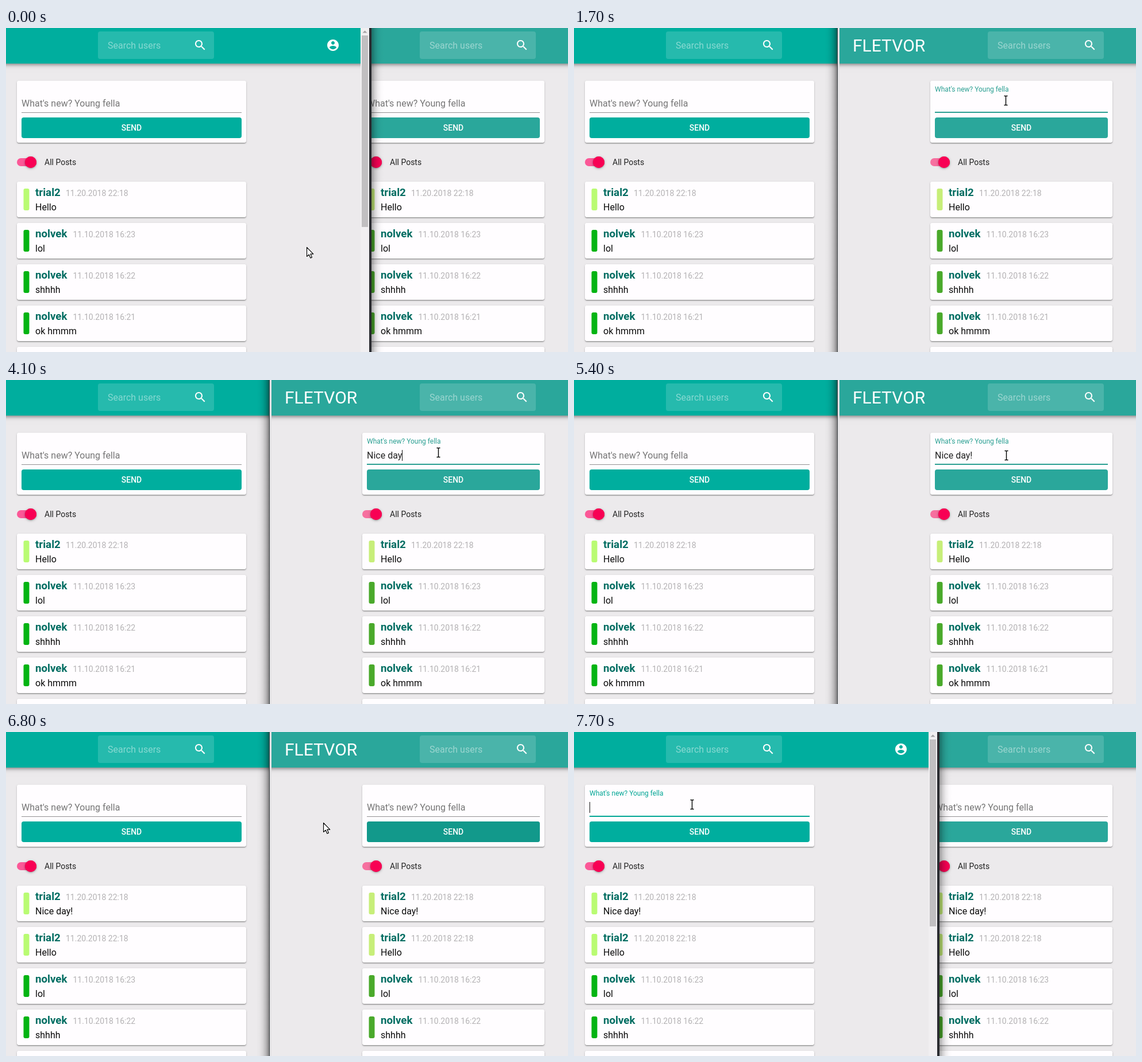
Recreate the animation shown at these times as an HTML page with a canvas. Size 978 by 565 pixels, loop 8 s.

```html
<!DOCTYPE html>
<html lang="en">
<head>
<meta charset="utf-8">
<title>Two windows, one feed</title>
<style>
  html, body { margin: 0; width: 100%; height: 100%; overflow: hidden; }
  canvas { display: block; }
</style>
</head>
<body>
<canvas id="stage" width="978" height="565"></canvas>
<script>
const ctx = document.getElementById('stage').getContext('2d');
const LOOP = 8000, STEP = 100, H = 565;

const SEARCH = new Path2D('M15.5 14h-.79l-.28-.27C15.41 12.59 16 11.11 16 9.5 16 5.91 13.09 3 9.5 3S3 5.91 3 9.5 5.91 16 9.5 16c1.61 0 3.09-.59 4.23-1.57l.27.28v.79l5 4.99L20.49 19l-4.99-5zm-6 0C7.01 14 5 11.99 5 9.5S7.01 5 9.5 5 14 7.01 14 9.5 11.99 14 9.5 14z');
const ACCOUNT = new Path2D('M12 2C6.48 2 2 6.48 2 12s4.48 10 10 10 10-4.48 10-10S17.52 2 12 2zm0 3c1.66 0 3 1.34 3 3s-1.34 3-3 3-3-1.34-3-3 1.34-3 3-3zm0 14.2c-2.5 0-4.71-1.28-6-3.22.03-1.99 4-3.08 6-3.08 1.99 0 5.97 1.09 6 3.08-1.29 1.94-3.5 3.22-6 3.22z');
const ARROW = new Path2D('M.5.5v16l3.7-3.4 2.6 6 2.7-1.2-2.6-5.8h5z');
const BEAM = new Path2D('M-3-8h2.2L0-7.4.8-8H3M-3 8h2.2L0 7.4.8 8H3M0-7.4V7.4');
const HAND = new Path2D('M-1.5 8V1Q0-1 1.5 1V6Q3 4.8 4.3 6.2 6 5.2 7 6.8 9.5 6 10 8.5V12L8.5 15.5H0L-4.5 9.5Q-4.5 7.2-2.5 8.2L-1.5 9.5z');

const POSTS = [
  ['trial2', '11.20.2018 22:18', 'Nice day!'],
  ['trial2', '11.20.2018 22:18', 'Hello'],
  ['nolvek', '11.10.2018 16:23', 'lol'],
  ['nolvek', '11.10.2018 16:22', 'shhhh'],
  ['nolvek', '11.10.2018 16:21', 'ok hmmm'],
  ['nolvek', '11.10.2018 16:21', 'hey'],
];
const POSTED = 5900;

// Typing: [time, text]; an empty caret interval means the caret is hidden.
const TYPED = [[0, ''], [2300, 'N'], [2600, 'Nic'], [2800, 'Nice'], [3000, 'Nice '],
  [3800, 'Nice d'], [3900, 'Nice da'], [4100, 'Nice day'], [4300, 'Nice day!'], [5800, '']];
const CARET_ON = [[1200, 1700], [2300, 3500], [3800, 4900]];

// Pointer path: [time, x, y], eased between the points.
const POINTER = [[400, 523, 382], [1000, 751, 127], [1800, 751, 127], [1900, 752, 127],
  [5300, 752, 127], [5400, 752, 132], [5500, 752, 132], [5700, 778, 178],
  [6500, 778, 178], [7200, 205, 127]];

const LEFT = {
  card: 19, width: 399, search: 160, teal: '#00ae9e', dark: '#00897b', accent: '#00a594',
  track: '#fb5897', lime: '#b9fb73', green: '#04b413',
};
const RIGHT = {
  card: 620, width: 317, search: 720, teal: '#2aa79b', dark: '#039080', accent: '#2a9f92',
  track: '#f6709f', lime: '#c7ee79', green: '#4aa92b',
};

const ramp = (t, from, span) => Math.min(1, Math.max(0, (t - from) / span));
const easeOut = p => 1 - (1 - p) ** 3;
const smooth = p => p * p * (3 - 2 * p);
const mix = (a, b, p) => a + (b - a) * p;
const pulse = (t, on, off, span) => easeOut(ramp(t, on, span)) - easeOut(ramp(t, off, span));
const within = (t, spans) => spans.some(([a, b]) => t >= a && t < b);

function rect(x, y, w, h, fill, radius = 0) {
  ctx.fillStyle = fill;
  ctx.beginPath();
  ctx.roundRect(x, y, w, h, radius);
  ctx.fill();
}

function raised(shadows, draw) {
  for (const [dy, blur, alpha] of shadows) {
    ctx.shadowColor = `rgba(0,0,0,${alpha})`;
    ctx.shadowOffsetY = dy;
    ctx.shadowBlur = blur;
    draw();
  }
  ctx.shadowColor = 'transparent';
}

function text(str, x, y, size, fill, weight = 400, align = 'left') {
  ctx.font = `${weight} ${size}px Roboto, sans-serif`;
  ctx.textAlign = align;
  ctx.fillStyle = fill;
  ctx.fillText(str, x, y);
}

function icon(path, x, y) {
  ctx.save();
  ctx.translate(x, y);
  ctx.fillStyle = '#fff';
  ctx.fill(path);
  ctx.restore();
}

const panel = (x, y, w, h) =>
  raised([[1, 3, .2], [1, 1, .14], [2, 1, .12]], () => rect(x, y, w, h, '#fffdff', 4));

function header(skin, x, w) {
  raised([[2, 4, .2], [4, 5, .14], [1, 10, .12]], () => rect(x - 20, -20, w + 40, 82, skin.teal));
  rect(skin.search, 6, 202, 48, 'rgba(255,255,255,.15)', 4);
  text('Search users', skin.search + 17, 36, 16, 'rgba(255,255,255,.45)');
  icon(SEARCH, skin.search + 166, 18);
}

function composer(skin, s) {
  const x = skin.card + 8, w = skin.width - 16;
  panel(skin.card, 92, skin.width, 108);

  if (!s.value) s.float = Math.min(s.float, 1);
  text("What's new? Young fella", x, mix(137, 111, s.float), mix(16, 12, s.float),
    s.focused ? skin.accent : '#757575');
  text(s.value, x, 137, 16, '#212121');
  if (s.caret) {
    ctx.font = '16px Roboto, sans-serif';
    rect(Math.round(x + ctx.measureText(s.value).width), 122, 1, 19, '#111');
  }

  rect(x, 147, w, 1, '#919092');
  if (s.hover) rect(x, 146, w, 2, `rgba(25,20,30,${s.hover})`);
  rect(x + w / 2 * (1 - s.line), 146, w * s.line, 2, skin.accent);

  rect(x, 156, w, 36, skin.teal, 4);
  ctx.save();
  ctx.globalAlpha = s.press;
  rect(x, 156, w, 36, skin.dark, 4);
  ctx.restore();
  if (s.ripple > 0) {
    ctx.save();
    ctx.clip();
    ctx.beginPath();
    ctx.arc(778, 179, s.ripple, 0, 7);
    ctx.fillStyle = `rgba(255,255,255,${s.glow})`;
    ctx.fill();
    ctx.restore();
  }
  text('SEND', x + w / 2, 179, 14, '#fff', 500, 'center');
}

function toggle(skin) {
  const x = skin.card;
  rect(x, 227, 34, 14, skin.track, 7);
  raised([[1, 4, .3], [1, 2, .15]], () => rect(x + 14, 224, 20, 20, '#f80054', 10));
  text('All Posts', x + 48, 239, 14, '#222');
}

function feed(skin, t) {
  const x = skin.card;
  POSTS.slice(t < POSTED ? 1 : 0).forEach(([user, date, message], i) => {
    const y = 268 + 72 * i, guest = user === 'trial2';
    panel(x, y, skin.width, 62);
    rect(x + 11.5, y + 12, 10, 38, guest ? skin.lime : skin.green, 3);
    text(user, x + 32, y + 25, 18.72, '#006d62', 700);
    text(date, x + (guest ? 85 : 97.5), y + 25, 14, '#b4b2b4');
    text(message, x + 32, y + 50, 16, '#0a0a0a');
  });
}

function page(skin, x, w, t, state) {
  ctx.save();
  ctx.beginPath();
  ctx.rect(x, 0, w, H);
  ctx.clip();
  rect(x, 0, w, H, '#eceaec');
  composer(skin, state);
  toggle(skin);
  feed(skin, t);
  header(skin, x, w);
  if (skin === LEFT) icon(ACCOUNT, 557, 18);
  else text('FLETVOR', 485, 41, 30, '#fff');
  ctx.restore();
}

function sideShadow(from, to, alpha) {
  const g = ctx.createLinearGradient(from, 0, to, 0);
  [1, .5, .2, .05, 0].forEach((a, i) => g.addColorStop(i / 4, `rgba(0,0,0,${a * alpha})`));
  rect(Math.min(from, to), 0, Math.abs(to - from), H, g);
}

function leftWindow(t) {
  sideShadow(636, 658, .35);
  page(LEFT, 0, 617, t, {
    value: '', focused: t >= 7450, caret: t >= 7500,
    float: easeOut(ramp(t, 7450, 200)), line: easeOut(ramp(t, 7450, 200)),
    hover: ramp(t, 6950, 200), press: 0, ripple: 0,
  });
  rect(617, 0, 15, H, '#f1eff1');
  rect(619, 13, 11, t < POSTED ? 334 : 326, '#c1bfc1');
  ctx.fillStyle = '#a3a1a3';
  ctx.beginPath();
  ctx.moveTo(620.5, 8.5);
  ctx.lineTo(624.5, 4.5);
  ctx.lineTo(628.5, 8.5);
  ctx.fill();
  rect(632, 0, 4, H, '#2a2b30');
}

function rightWindow(t) {
  sideShadow(458, 436, .45);
  rect(458, 0, 1, H, '#3c4144');
  rect(459, 0, 3, H, '#e4e3e5');
  page(RIGHT, 462, 516, t, {
    value: TYPED.findLast(([from]) => t >= from)[1],
    focused: t >= 1050 && t < 5700,
    caret: within(t, CARET_ON),
    float: pulse(t, 1050, 5800, 200),
    line: pulse(t, 1050, 5700, 200),
    hover: ramp(t, 750, 200) - ramp(t, 5450, 200),
    press: ramp(t, 5550, 250) - ramp(t, 6700, 250),
    ripple: 155 * easeOut(ramp(t, 5700, 550)),
    glow: .3 * (1 - ramp(t, 5750, 550)) ** 2,
  });
}

function pointerAt(t) {
  const i = POINTER.findIndex(([time]) => time > t);
  if (i === 0) return POINTER[0].slice(1);
  if (i < 0) return POINTER[POINTER.length - 1].slice(1);
  const [t0, x0, y0] = POINTER[i - 1], [t1, x1, y1] = POINTER[i];
  const p = smooth((t - t0) / (t1 - t0));
  return [mix(x0, x1, p), mix(y0, y1, p)];
}

function pointer(t) {
  const [x, y] = pointerAt(t).map(Math.round);
  const inside = (x > 27 && x < 410) || (x > 636 && x < 929);
  const stroke = (path, color, width) => {
    ctx.strokeStyle = color;
    ctx.lineWidth = width;
    ctx.stroke(path);
  };
  ctx.save();
  ctx.lineJoin = 'round';
  if (inside && y > 112 && y < 149) {
    ctx.translate(x + .5, y - .5);
    stroke(BEAM, '#fff', 3.4);
    stroke(BEAM, '#000', 1.4);
  } else {
    const path = inside && y >= 156 && y < 192 ? HAND : ARROW;
    ctx.translate(x, y);
    stroke(path, path === HAND ? '#000' : '#fff', 2.4);
    ctx.fillStyle = '#fff';
    ctx.fill(path);
    stroke(path, '#000', 1.2);
    if (path === HAND) stroke(new Path2D('M1.5 6V9M4.3 6.4V9M7 7V9'), '#000', 1);
  }
  ctx.restore();
}

function frame() {
  const t = Math.floor(performance.now() % LOOP / STEP) * STEP;
  const order = t >= 900 && t < 7400 ? [leftWindow, rightWindow] : [rightWindow, leftWindow];
  order.forEach(draw => draw(t));
  pointer(t);
  requestAnimationFrame(frame);
}
frame();
</script>
</body>
</html>
```
